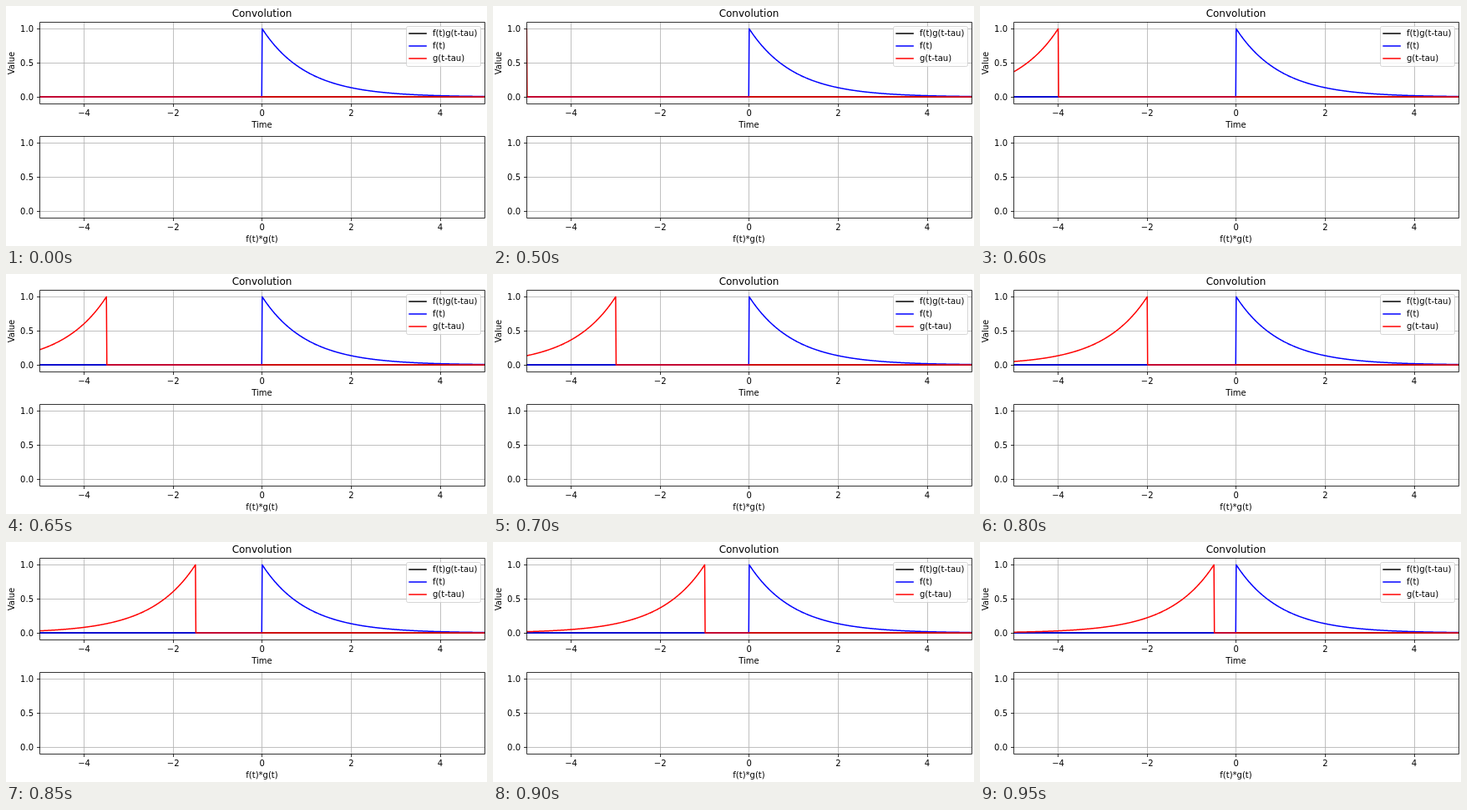
An HTML page with a canvas for the animation above (1 s loop, 576 px wide and 288 px high).

```html
<!DOCTYPE html>
<html>
<head>
<meta charset="utf-8">
<style>
html, body { margin: 0; width: 576px; height: 288px; overflow: hidden; background: #fff; }
canvas { display: block; }
</style>
</head>
<body>
<canvas id="stage" width="576" height="288"></canvas>
<script>
const c = document.getElementById('stage').getContext('2d');
const X = t => 40.3 + (t + 5) * 53.3;
const Y = v => 109.1 - 81.8 * v;
const snap = p => Math.floor(p) + 0.5;
const BASE = 109;
const LOWER = 137; // vertical offset of the second plot

function line(color, width, ...points) {
  c.strokeStyle = color;
  c.lineWidth = width;
  c.beginPath();
  for (const [x, y] of points) c.lineTo(x, y);
  c.stroke();
}

function text(s, x, y, align = 'center', size = 10) {
  c.font = size + 'px "DejaVu Sans", sans-serif';
  c.textAlign = align;
  c.fillStyle = '#000';
  c.fillText(s, x, y);
}

function grid(dy) {
  for (const t of [-4, -2, 0, 2, 4]) {
    const x = snap(X(t));
    line('#b0b0b0', 0.8, [x, 19 + dy], [x, 117 + dy]);
    line('#000', 0.8, [x, 117.5 + dy], [x, 121 + dy]);
    text(String(t).replace('-', '\u2212'), X(t), 132 + dy);
  }
  for (const v of [0, 0.5, 1]) {
    const y = snap(Y(v)) + dy;
    line('#b0b0b0', 0.8, [40, y], [573, y]);
    line('#000', 0.8, [37, y], [40.5, y]);
    text(v.toFixed(1), 33, Math.floor(Y(v)) + 4 + dy, 'right');
  }
}

function frame(dy) {
  c.strokeStyle = '#000';
  c.lineWidth = 0.8;
  c.strokeRect(40.5, 19.5 + dy, 533, 98);
}

function curve(color, fn) {
  const points = [];
  for (let i = -500; i <= 500; i++) points.push([X(i / 100), Y(fn(i / 100))]);
  line(color, 1.5, ...points);
}

function legend() {
  c.beginPath();
  c.roundRect(479.5, 24.5, 89, 48, 2);
  c.fillStyle = 'rgba(255,255,255,0.8)';
  c.fill();
  c.strokeStyle = 'rgba(204,204,204,0.8)';
  c.lineWidth = 1;
  c.stroke();
  [['f(t)g(t-tau)', '#000'], ['f(t)', '#00f'], ['g(t-tau)', '#f00']].forEach(([s, color], i) => {
    const y = 33 + 15 * i;
    line(color, 1.5, [482.3, y], [503.8, y]);
    text(s, 511, y + 3);
  });
}

function draw(ms) {
  const step = Math.floor((ms - 500) / 50);
  const tau = -5 + step / 2;
  c.fillStyle = '#fff';
  c.fillRect(0, 0, 576, 288);
  c.lineJoin = 'round';
  grid(0);
  grid(LOWER);

  c.save();
  c.beginPath();
  c.rect(40, 19, 534, 99);
  c.clip();
  line('#000', 1.5, [40, BASE], [574, BASE]);
  curve('#00f', t => t < 0 ? 0 : Math.exp(-t));
  if (step < 0) line('#f00', 1.5, [40, BASE], [574, BASE]);
  else curve('#f00', t => t > tau ? 0 : Math.exp(t - tau));
  c.restore();

  frame(0);
  frame(LOWER);
  legendLeft();
  text('Convolution', 306.5, 13, 'center', 12);
  text('Time', 306.5, 146);
  text('f(t)*g(t)', 306.5, 283);
  c.save();
  c.translate(10, 68.5);
  c.rotate(-Math.PI / 2);
  text('Value', 0, 0);
  c.restore();
}

function legendLeft() {
  c.beginPath();
  c.roundRect(479.5, 24.5, 89, 48, 2);
  c.fillStyle = 'rgba(255,255,255,0.8)';
  c.fill();
  c.strokeStyle = 'rgba(204,204,204,0.8)';
  c.lineWidth = 1;
  c.stroke();
  [['f(t)g(t-tau)', '#000'], ['f(t)', '#00f'], ['g(t-tau)', '#f00']].forEach(([s, color], i) => {
    const y = 33 + 15 * i;
    line(color, 1.5, [482.3, y], [503.8, y]);
    text(s, 511, y + 3, 'left');
  });
}

const start = performance.now();
function tick() {
  draw((performance.now() - start) % 1000);
  requestAnimationFrame(tick);
}
tick();
</script>
</body>
</html>
```
